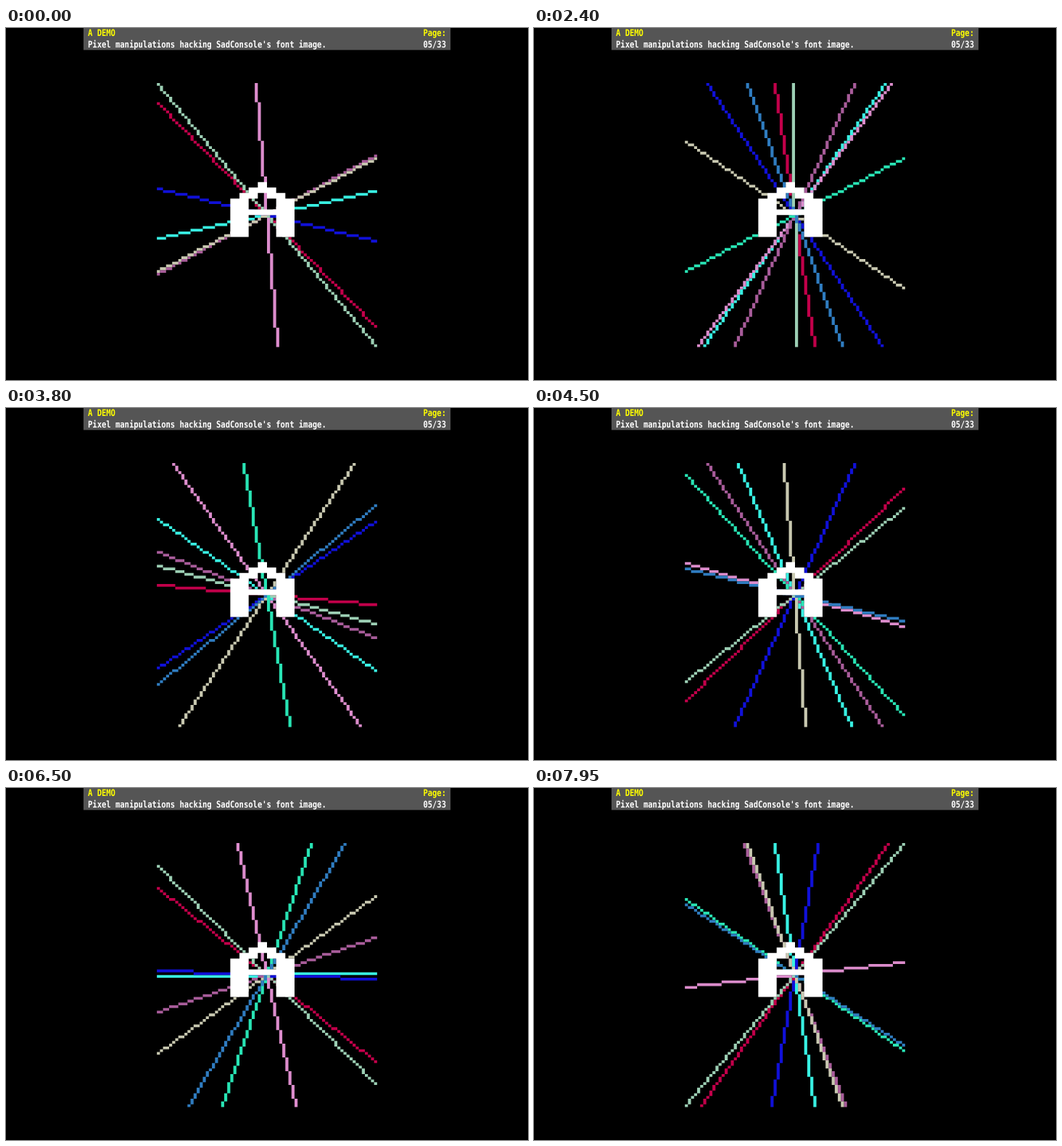
An HTML page with a canvas that plays this animation: 720x486 px, repeating every 8000 ms.

```html
<!DOCTYPE html>
<html lang="en">
<head>
<meta charset="utf-8">
<title>A DEMO</title>
<style>
  html, body { margin: 0; width: 100%; height: 100%; overflow: hidden; background: #000; }
  canvas, svg { position: absolute; left: 0; top: 0; width: 720px; height: 486px; }
  text {
    font: bold 10.51px "DejaVu Sans Mono", monospace;
    text-rendering: geometricPrecision;
    white-space: pre;
    fill: #fff;
  }
  .title { fill: #ff0; }
</style>
</head>
<body>
<canvas id="stage" width="720" height="486"></canvas>
<svg viewBox="0 0 720 486">
  <rect x="106.875" width="506.25" height="30.375" fill="#555"/>
  <g transform="scale(1 1.22)">
    <text class="title" x="113" y="9.3">A DEMO</text>
    <text class="title" x="607" y="9.3" text-anchor="end">Page:</text>
    <text x="113" y="21.8">Pixel manipulations hacking SadConsole's font image.</text>
    <text x="607" y="21.8" text-anchor="end">05/33</text>
  </g>
</svg>
<script>
const ctx = document.getElementById('stage').getContext('2d');
const LOOP = 8000, STEP = 50;
const COLS = 72, ROWS = 96;
const LEFT = 208.125, TOP = 75.9375, CELL_W = 4.21875, CELL_H = 3.796875;
const SPEED = 0.03143; // sides of the box per step

// start: place along the border in sides, clockwise from the top left corner
const lines = [
  { color: '#38f0e2', start: 1.4058, dir: 1 },
  { color: '#dc8ccc', start: 0.455, dir: -1 },
  { color: '#a85c9a', start: 1.2725, dir: 1 },
  { color: '#c8c8b0', start: 1.285, dir: -1 },
  { color: '#1010d8', start: 1.605, dir: -1 },
  { color: '#c2004a', start: 1.9222, dir: -1 },
  { color: '#9ccfb4', start: 0.0023, dir: -1 },
  { color: '#28e4b4', start: 0.788, dir: -1, from: 25 },
  { color: '#2f7cc0', start: 0.772, dir: 1, from: 39 }
];

// Letter A, one byte per glyph row
const glyph = [0x10, 0x38, 0x6c, 0xc6, 0xc6, 0xfe, 0xc6, 0xc6, 0xc6, 0xc6];

function addCells(col, row, w, h) {
  ctx.rect(LEFT + col * CELL_W, TOP + row * CELL_H, w * CELL_W, h * CELL_H);
}

function drawLine({ color, start, dir, from = 0 }, n) {
  if (n < from) return;
  const u = (((start + dir * SPEED * n) % 2) + 2) % 2;
  const mx = COLS - 1, my = ROWS - 1;
  // One end on the top or right side, the other mirrored through the centre
  const x0 = u < 1 ? Math.round(u * mx) : mx;
  const y0 = u < 1 ? 0 : Math.round((u - 1) * my);
  const dx = mx - 2 * x0, dy = my - 2 * y0;
  const count = Math.max(Math.abs(dx), Math.abs(dy));
  ctx.beginPath();
  for (let i = 0; i <= count; i++) {
    addCells(Math.round(x0 + dx * i / count), Math.round(y0 + dy * i / count), 1, 1);
  }
  ctx.fillStyle = color;
  ctx.fill();
}

function drawLetter() {
  ctx.beginPath();
  glyph.forEach((bits, r) => {
    for (let c = 0; c < 8; c++) {
      if (bits & (0x80 >> c)) addCells(24 + c * 3, 36 + r * 2, 3, 2);
    }
  });
  ctx.fillStyle = '#fff';
  ctx.fill();
}

function draw(time) {
  const n = Math.floor((time % LOOP) / STEP);
  ctx.fillStyle = '#000';
  ctx.fillRect(0, 0, 720, 486);
  lines.forEach(line => drawLine(line, n));
  drawLetter();
}

function tick() {
  draw(performance.now());
  requestAnimationFrame(tick);
}
tick();
</script>
</body>
</html>
```
